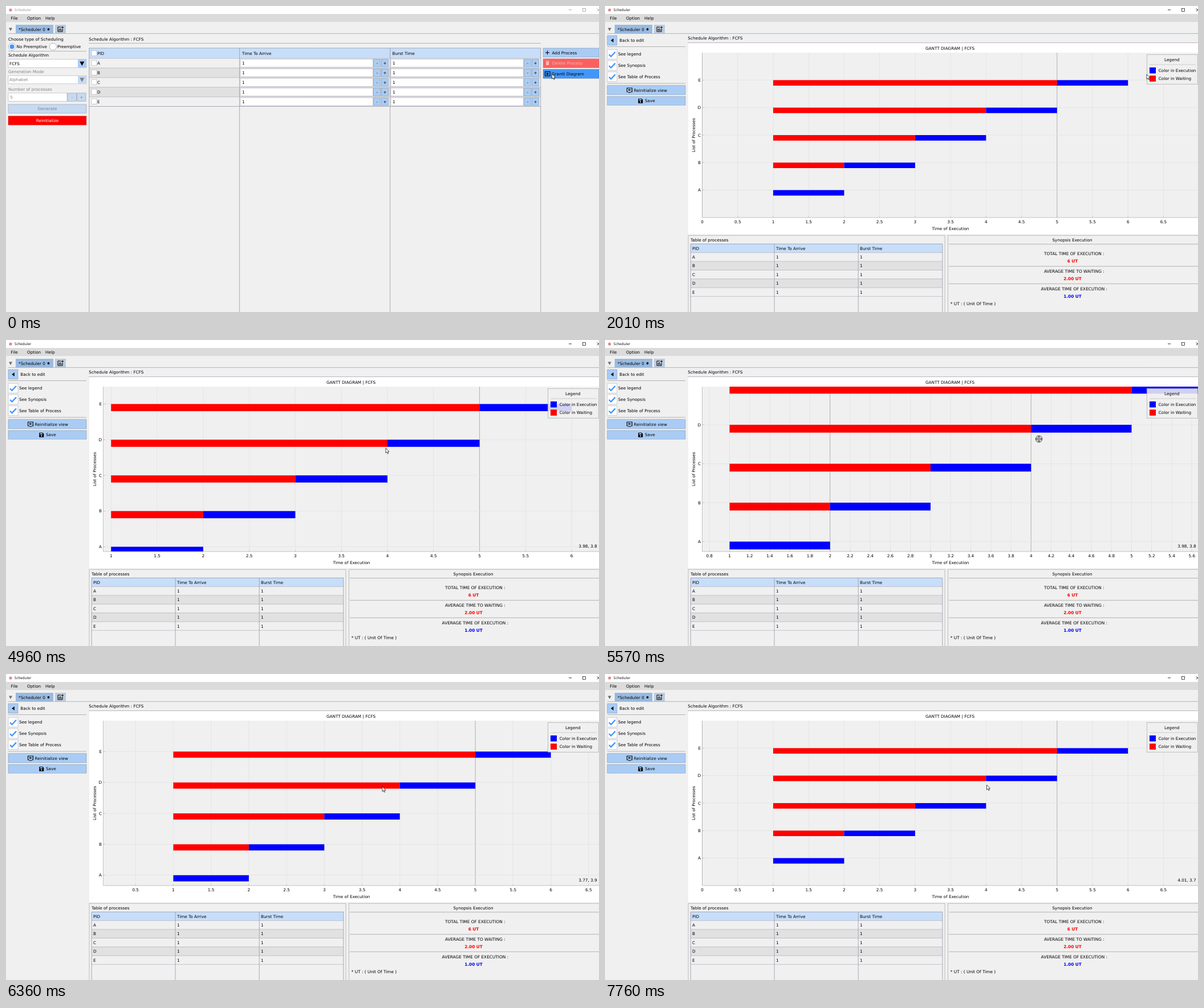
These frames come from a looping animation (1040x538 px, 8 s). An HTML page with a canvas:

```html
<!DOCTYPE html>
<html lang="en">
<head>
<meta charset="utf-8">
<title>Scheduler</title>
<style>
html, body { margin: 0; width: 100%; height: 100%; overflow: hidden; background: #f0f0f0; }
canvas { display: block; width: 1040px; height: 538px; }
</style>
</head>
<body>
<canvas id="stage" width="1040" height="538"></canvas>
<script>
const ctx = document.getElementById('stage').getContext('2d');
const LOOP = 8000;
const BG = '#f0f0f0', BUTTON = '#aaccf4', OFF = '#c6daf2', HOVER = '#4296fa';
const HEAD = '#c7defa', EDGE = '#9797a6', FAINT = '#b7b7c3', SEP = '#a3a3a3', DIM = '#828282';
const RED = '#ff0000', BLUE = '#0000ff';
const PIDS = ['A', 'B', 'C', 'D', 'E'];
const PLOT = { x: 170.5, y: 82, w: 871.15, h: 290 };

// Drawing helpers
function rect(x, y, w, h, fill, stroke) {
  if (fill) { ctx.fillStyle = fill; ctx.fillRect(x, y, w, h); }
  if (stroke) { ctx.strokeStyle = stroke; ctx.lineWidth = 0.7; ctx.strokeRect(x, y, w, h); }
}
function line(points, color = SEP, width = 0.8) {
  ctx.beginPath();
  points.forEach(([x, y]) => ctx.lineTo(x, y));
  ctx.strokeStyle = color;
  ctx.lineWidth = width;
  ctx.stroke();
}
const hline = (x1, x2, y, color, width) => line([[x1, y], [x2, y]], color, width);
const vline = (x, y1, y2, color, width) => line([[x, y1], [x, y2]], color, width);
function shape(points, fill, stroke) {
  ctx.beginPath();
  points.forEach(([x, y]) => ctx.lineTo(x, y));
  ctx.closePath();
  ctx.fillStyle = fill;
  ctx.fill();
  if (stroke) { ctx.strokeStyle = stroke; ctx.lineWidth = 0.7; ctx.stroke(); }
}
function disc(x, y, r, fill, stroke) {
  ctx.beginPath();
  ctx.arc(x, y, r, 0, 7);
  if (fill) { ctx.fillStyle = fill; ctx.fill(); }
  if (stroke) { ctx.strokeStyle = stroke; ctx.lineWidth = 0.7; ctx.stroke(); }
}
function text(str, x, y, { color = '#000', align = 'left', size = 7.25, bold = false, family = '"DejaVu Sans"' } = {}) {
  ctx.font = `${bold ? 'bold ' : ''}${size}px ${family}, sans-serif`;
  ctx.textAlign = align;
  ctx.fillStyle = color;
  ctx.fillText(str, x, y + size * 0.36);
}
const centered = (str, x, y, options) => text(str, x, y, { align: 'center', ...options });
const down = (x, y, r, color) => shape([[x - r, y - r * 0.8], [x + r, y - r * 0.8], [x, y + r]], color);
function button(label, x, y, w, h, fill = BUTTON, color = '#000') {
  rect(x, y, w, h, fill, 'rgba(0,0,0,.28)');
  centered(label, x + w / 2, y + h / 2, { color });
}
function spinner(x, y, w, h, gap, value, color = '#000', fill = BUTTON) {
  const size = gap - 1.3;
  rect(x, y, w, h, '#fff', FAINT);
  text(value, x + 3, y + h / 2, { color });
  button('-', x + w + 1, y, size, h, fill, color);
  button('+', x + w + 1 + gap, y, size, h, fill, color);
}

function windowChrome(active) {
  const ink = active ? '#000' : '#8f8f8f';
  rect(0, 0, 1040, 538, BG);
  rect(0, 0, 1040, 14, '#fff');
  disc(8, 7, 2.6, '#dc8a8a');
  text('Scheduler', 15, 6.8, { size: 6.3, family: '"Open Sans"', color: ink });
  hline(987, 992, 6.8, ink);
  rect(1011.5, 4.3, 5, 5, null, ink);
  line([[1036.5, 4.3], [1041.5, 9.3]], ink);
  line([[1036.5, 9.3], [1041.5, 4.3]], ink);
  rect(0, 14, 1040, 14, '#dbdbdb');
  text('File', 8.5, 21.5);
  text('Option', 37, 21.5);
  text('Help', 69, 21.5);
  down(8, 41, 3, '#6e6e6e');
  rect(17, 33, 66, 15, '#99bae0');
  text('*Scheduler 0', 22, 41);
  disc(74.5, 41, 1.9, '#000');
  rect(86, 33, 19, 15, '#bdcbdb');
  line([[96, 37], [91, 37], [91, 45], [99, 45], [99, 40]], '#000', 1);
  vline(93.3, 40.5, 43.5, '#000', 1);
  vline(95.2, 39, 43.5, '#000', 1);
  vline(97, 41.5, 43.5, '#000', 1);
  hline(97, 101, 37.6, '#000', 1);
  vline(99, 35.6, 39.6, '#000', 1);
  hline(4, 1040, 48.4, '#99bae0', 1);
}

function editorSidebar() {
  text('Choose type of Scheduling', 4, 58.5);
  disc(10.5, 71.5, 6.2, '#fff', '#999');
  disc(10.5, 71.5, 4, HOVER);
  text('No Preemptive', 18.5, 71.5);
  disc(82.5, 71.5, 6.2, '#fff', '#999');
  text('Preemptive', 90, 71.5);
  hline(4, 141, 79.5);
  const combo = (title, value, y, color, fill) => {
    text(title, 4, y, { color });
    rect(4, y + 7, 137, 14.5, '#fff', FAINT);
    rect(126, y + 7, 15, 14.5, fill);
    down(133.3, y + 14.2, 4, color);
    text(value, 6, y + 14.3, { color });
  };
  combo('Schedule Algorithm', 'FCFS', 86.8, '#000', BUTTON);
  combo('Generation Mode', 'Alphabet', 115.3, DIM, OFF);
  text('Number of processes', 4, 146.3, { color: DIM });
  spinner(4, 153, 103, 14.5, 16.7, '5', DIM, OFF);
  button('Generate', 4, 173, 137, 15.3, OFF, DIM);
  button('Reinitialize', 4, 193.5, 137, 15.7, RED, '#fff');
}

function editor() {
  editorSidebar();
  text('Schedule Algorithm : FCFS', 145.3, 58.5);
  hline(145, 938, 65.6);
  rect(146, 74, 792, 18, HEAD);
  rect(150, 78.3, 9, 9.4, '#fff', FAINT);
  text('PID', 160, 83);
  text('Time To Arrive', 414, 83);
  text('Burst Time', 677.5, 83);
  PIDS.forEach((pid, i) => {
    const top = 92 + i * 16.95;
    if (i % 2) rect(146, top, 792, 17, '#e1e1e1');
    hline(146, 938, top, FAINT);
    rect(150, top + 3.3, 9, 9.4, '#fff', FAINT);
    text(pid, 160, top + 8.2);
    spinner(411, top + 1.3, 232.5, 14, 13.8, '1');
    spinner(675, top + 1.3, 232.5, 14, 13.8, '1');
  });
  hline(146, 938, 176.5, EDGE);
  [145.8, 409.6, 673.6, 937.7].forEach(x => vline(x, 74, 538, EDGE));
  hline(146, 938, 74, EDGE);

  rect(942, 74, 98, 16, BUTTON, 'rgba(0,0,0,.28)');
  hline(946, 953, 82, '#000', 1.1);
  vline(949.5, 78.5, 85.5, '#000', 1.1);
  text('Add Process', 957.5, 82);
  rect(942, 92.7, 98, 16, '#fb6060', 'rgba(0,0,0,.15)');
  rect(947.2, 98, 5, 6, '#fbbcbc');
  hline(946.4, 953, 96.8, '#fbbcbc', 1);
  text('Delete Process', 957.5, 100.7, { color: '#fbb4b4' });
  rect(942, 111.3, 98, 16, HOVER, 'rgba(0,0,0,.28)');
  ctx.strokeStyle = '#000';
  ctx.lineWidth = 1.1;
  ctx.strokeRect(945.5, 115.5, 8.6, 7.4);
  rect(948, 117.4, 2, 3.8, '#000');
  rect(950.4, 118.3, 1.6, 2, '#000');
  text('Grantt Diagram', 957, 119.3);
}

function diagramSidebar() {
  rect(4, 52, 17, 17, BUTTON, 'rgba(0,0,0,.28)');
  shape([[10.2, 60.5], [14.8, 57], [14.8, 64]], '#000');
  text('Back to edit', 25.3, 60.5);
  hline(4, 141, 71.5);
  ['See legend', 'See Synopsis', 'See Table of Process'].forEach((label, i) => {
    const y = 76.2 + i * 19.8;
    rect(4, y, 17, 17, '#fff', FAINT);
    line([[7, y + 9], [10.5, y + 12.6], [18, y + 4.6]], HOVER, 2.3);
    text(label, 23, y + 8.6);
  });
  hline(4, 141, 136);
  rect(4, 139.7, 137, 16.3, BUTTON, 'rgba(0,0,0,.28)');
  line([[41, 151], [38.5, 151], [38.5, 144.2], [47.5, 144.2], [47.5, 151], [45, 151]], '#000', 1.1);
  shape([[40.3, 147.6], [43, 145.6], [43, 149.6]], '#000');
  hline(43, 46, 147.6, '#000', 1);
  hline(41, 45, 152, '#000', 1.1);
  text('Reinitialize view', 50.5, 148);
  rect(4, 159, 137, 15.3, BUTTON, 'rgba(0,0,0,.28)');
  shape([[58.3, 163], [64.3, 163], [66.3, 165], [66.3, 171], [58.3, 171]], '#000');
  rect(59.7, 164, 4.3, 2, BUTTON);
  disc(62.2, 168.6, 1.3, BUTTON);
  text('Save', 70, 166.8);
}

const toX = (view, v) => PLOT.x + (v - view.l) / (view.r - view.l) * PLOT.w;
const toY = (view, v) => PLOT.y + (view.t - v) / (view.t - view.b) * PLOT.h;

function chart(view) {
  const bottom = PLOT.y + PLOT.h;
  rect(146, 65.5, 894, 335.5, '#fff');
  rect(PLOT.x, PLOT.y, PLOT.w, PLOT.h, BG);
  centered('GANTT DIAGRAM | FCFS', 605, 74.8);
  centered('Time of Execution', 606, 391);
  ctx.save();
  ctx.translate(155.7, 227);
  ctx.rotate(-Math.PI / 2);
  centered('List of Processes', 0, 0);
  ctx.restore();

  const wide = view.r - view.l > 5;
  const step = wide ? 0.5 : 0.2;
  for (let k = Math.ceil(view.l / step - 1e-6); k * step <= view.r; k++) {
    const x = toX(view, k * step);
    if (x > 1037) break;
    const major = k % 10 === 0;
    vline(x, PLOT.y, bottom, major ? '#b0b0b0' : '#e3e3e3', major ? 1 : 0.8);
    vline(x, bottom - 2.5, bottom, '#bbb');
    centered(String(+(k * step).toFixed(1)), x, 379.3);
  }
  PIDS.forEach((pid, i) => {
    const y = toY(view, i + 1);
    if (y < PLOT.y || y > bottom) return;
    hline(PLOT.x, 1040, y, '#e3e3e3');
    hline(PLOT.x, PLOT.x + 3.5, y, '#bbb');
    text(pid, 168, y, { align: 'right' });
  });

  ctx.save();
  ctx.beginPath();
  ctx.rect(PLOT.x, PLOT.y, PLOT.w, PLOT.h);
  ctx.clip();
  PIDS.forEach((pid, i) => {
    const start = toX(view, 1), turn = toX(view, i + 1), end = toX(view, i + 2);
    const y = toY(view, i + 1), h = toY(view, i + 0.8) - y;
    rect(start, y, turn - start, h, RED);
    rect(turn, y, end - turn, h, BLUE);
  });
  ctx.restore();
  vline(PLOT.x, PLOT.y, bottom, '#b4b4b4');
  hline(PLOT.x, 1040, bottom, '#b4b4b4');
}

function legend() {
  rect(950.3, 85.3, 89, 52, 'rgba(240,240,240,.87)', '#a8a8a8');
  centered('Legend', 994.3, 94);
  hline(955, 1036, 103, '#c4c4c4');
  rect(955, 108, 11, 10.5, BLUE);
  rect(955, 122.4, 11, 10.5, RED);
  text('Color in Execution', 970.7, 113.3);
  text('Color in Waiting', 970.7, 127.7);
}

function panels() {
  rect(146, 403.3, 450, 140, BG, '#a8a8a8');
  text('Table of processes', 150, 411.6);
  rect(150, 418.3, 442, 15.3, HEAD);
  ['PID', 'Time To Arrive', 'Burst Time'].forEach((label, col) => {
    const x = 153 + col * 147;
    text(label, x, 426);
    PIDS.forEach((pid, i) => {
      const top = 433.6 + i * 15.4;
      if (i % 2) rect(150 + col * 147.2, top, 147.2, 15.4, '#e1e1e1');
      text(col ? '1' : pid, x, top + 7.8);
    });
  });
  for (let i = 0; i < 6; i++) hline(150, 592, 433.6 + i * 15.4, FAINT);
  [150.2, 297, 444.2, 591.8].forEach(x => vline(x, 418.3, 538, EDGE));
  hline(150, 592, 418.3, EDGE);

  rect(601.3, 403.3, 450, 140, BG, '#a8a8a8');
  centered('Synopsis Execution', 819.5, 411.8);
  [418.7, 457.7, 488.3].forEach(y => hline(603, 1040, y));
  const entry = (label, value, y, color) => {
    centered(label, 822.8, y, { size: 7.35 });
    centered(value, 820, y + 13, { size: 7.35, bold: true, color });
  };
  entry('TOTAL TIME OF EXECUTION :', '6 UT', 435.8, RED);
  entry('AVERAGE TIME TO WAITING :', '2.00 UT', 466.5, RED);
  entry('AVERAGE TIME OF EXECUTION :', '1.00 UT', 497.2, BLUE);
  text('* UT : ( Unit Of Time )', 605.8, 523.7, { size: 7.35 });
}

function pointer({ x, y, mode }) {
  if (mode === 'pan') {
    disc(x, y, 5.8, null, '#000');
    for (let i = 0; i < 4; i++) {
      ctx.save();
      ctx.translate(x, y);
      ctx.rotate(i * Math.PI / 2);
      shape([[-2, -3], [0, -5.2], [2, -3]], '#fff', '#000');
      ctx.restore();
    }
    disc(x, y, 1.4, '#fff', '#000');
    return;
  }
  if (mode === 'click') disc(x + 1, y + 1, 5.8, null, '#000');
  const outline = [[0, 0], [0, 8.6], [2, 6.9], [3.4, 9.9], [4.7, 9.3], [3.4, 6.4], [6, 6.2]];
  shape(outline.map(([dx, dy]) => [x + dx, y + dy]), '#fff', '#000');
}

// View changes: wheel steps around the pointer, kept inside 0..7 by 0..6
const HOME = { l: 0, r: 7, b: 0, t: 6 };
const valueAt = (v, x, y) => [
  v.l + (x - PLOT.x) / PLOT.w * (v.r - v.l),
  v.t - (y - PLOT.y) / PLOT.h * (v.t - v.b)
];
function zoom(view, x, y, steps) {
  const rate = steps > 0 ? -1 / 12 : 0.1;
  for (let i = 0; i < Math.abs(steps); i++) {
    const [vx, vy] = valueAt(view, x, y);
    view = {
      l: Math.max(0, view.l - (vx - view.l) * rate),
      r: Math.min(7, view.r + (view.r - vx) * rate),
      b: Math.max(0, view.b - (vy - view.b) * rate),
      t: Math.min(6, view.t + (view.t - vy) * rate)
    };
  }
  return view;
}
const near = zoom(HOME, 666, 190, 3);
const close = zoom(HOME, 666, 190, 4);
const panned = (l, b) => ({ l, b, r: l + close.r - close.l, t: b + close.t - close.b });
const dropped = panned(0.991, 1.5);
const out = n => zoom(dropped, 660, 198, -n);
const probe = n => zoom(HOME, 669.5, 195, n);

// time, pointer x, pointer y, view, pointer mode
const STEPS = [
  [0, 957.5, 119.5],
  [1150, 957.5, 119.5, null, 'click'],
  [1290, 957.5, 119.5, HOME],
  [2010, 950, 120, HOME],
  [2160, 905, 150, HOME],
  [2300, 820, 205, HOME],
  [2440, 735, 232, HOME],
  [2580, 692, 215, HOME],
  [2730, 712, 190, HOME],
  [2870, 765, 190, HOME],
  [3010, 805, 196, HOME],
  [3160, 814, 195, HOME],
  [3300, 820, 203, HOME],
  [3440, 810, 214, HOME],
  [3580, 795, 221, HOME],
  [3720, 783, 224, HOME],
  [3840, 778, 224, HOME],
  [3980, 778, 224, HOME, 'click'],
  [4130, 778, 224, HOME],
  [4280, 730, 206, HOME],
  [4420, 661, 183, HOME],
  [4550, 666, 190, HOME],
  [4960, 666, 190, near],
  [5110, 666, 190, close],
  [5420, 705, 185, panned(1.03, 1.03), 'pan'],
  [5570, 761, 174, panned(0.728, 0.744), 'pan'],
  [5690, 790, 195, panned(0.55, 1.1), 'pan'],
  [5830, 755, 222, panned(0.75, 1.46), 'pan'],
  [5970, 714, 224, dropped, 'pan'],
  [6110, 660, 198, dropped],
  [6240, 660, 198, out(1)],
  [6360, 660, 198, out(3)],
  [6510, 660, 198, out(4)],
  [6660, 660, 198, out(5)],
  [6810, 669.5, 195, HOME],
  [7340, 669.5, 195, probe(3)],
  [7480, 669.5, 195, probe(5)],
  [7620, 669.5, 195, probe(2)],
  [7760, 669.5, 195, HOME]
].map(([time, x, y, view, mode]) => ({ time, x, y, view, mode }));

function coordinates(step) {
  if (step.mode === 'pan') return '3.98, 3.8';
  const [vx, vy] = valueAt(step.view, step.x, step.y);
  return `${vx.toFixed(2)}, ${vy.toFixed(1)}`;
}

function draw(step) {
  ctx.textRendering = 'geometricPrecision';
  windowChrome(step.time > 0);
  if (!step.view) {
    editor();
  } else {
    diagramSidebar();
    text('Schedule Algorithm : FCFS', 145.3, 56.3);
    hline(145, 1040, 64.5, '#b5a9b8');
    chart(step.view);
    if (step.time > 2010) text(coordinates(step), 1036.5, 362.3, { align: 'right' });
    legend();
    panels();
  }
  pointer(step);
}

let shown;
const began = performance.now();
function tick() {
  const t = (performance.now() - began) % LOOP;
  const step = STEPS.findLast(s => s.time <= t);
  if (step !== shown) draw(shown = step);
  requestAnimationFrame(tick);
}
tick();
</script>
</body>
</html>
```
